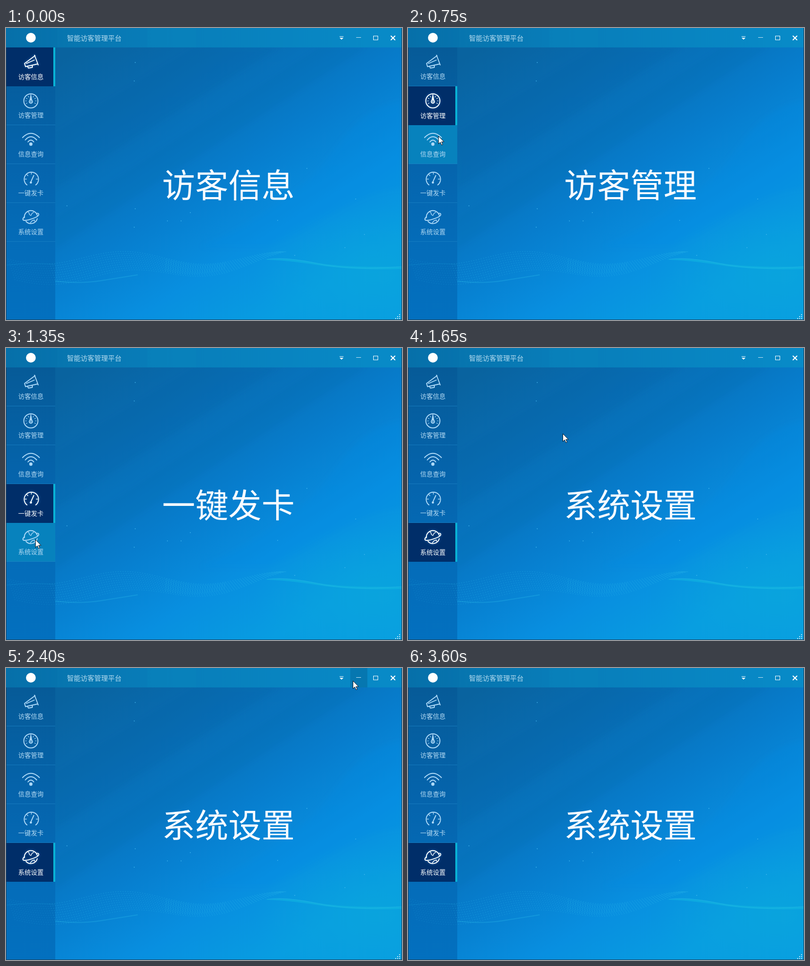
Write an HTML page that moves like this. It is 812 px wide and 601 px high and loops after 3900 ms.

```html
<!DOCTYPE html>
<html lang="zh-CN">
<head>
<meta charset="utf-8">
<style>
html, body { margin: 0; width: 100%; height: 100%; overflow: hidden; background: #0878c6; }
svg { display: block; width: 812px; height: 601px; }
text { font-family: "Noto Sans CJK SC", "Noto Sans CJK", sans-serif; text-anchor: middle; }
.ico { fill: none; stroke: currentColor; stroke-width: 1.9; stroke-linecap: round; stroke-linejoin: round; }
.solid { fill: currentColor; stroke: none; }
</style>
</head>
<body>
<svg viewBox="0 0 812 601">
  <defs>
    <linearGradient id="sky" gradientUnits="userSpaceOnUse" x1="200" y1="10" x2="560" y2="590">
      <stop offset="0" stop-color="#09639f"/>
      <stop offset=".22" stop-color="#086bb0"/>
      <stop offset=".4" stop-color="#0774be"/>
      <stop offset=".55" stop-color="#077dcd"/>
      <stop offset=".78" stop-color="#088fe0"/>
      <stop offset="1" stop-color="#089de1"/>
    </linearGradient>
    <linearGradient id="side" x1="0" y1="0" x2="0" y2="1">
      <stop offset="0" stop-color="#065b98"/>
      <stop offset=".4" stop-color="#0564ac"/>
      <stop offset=".75" stop-color="#046dba"/>
      <stop offset="1" stop-color="#0370bf"/>
    </linearGradient>
    <linearGradient id="bar" x1="0" y1="0" x2="1" y2="0">
      <stop offset="0" stop-color="#0771a9"/>
      <stop offset=".35" stop-color="#087cb8"/>
      <stop offset="1" stop-color="#088bc8"/>
    </linearGradient>
    <radialGradient id="teal">
      <stop offset="0" stop-color="#0aa6dc" stop-opacity=".7"/>
      <stop offset="1" stop-color="#0aa6dc" stop-opacity="0"/>
    </radialGradient>
    <filter id="soft" x="-20%" y="-20%" width="140%" height="140%"><feGaussianBlur stdDeviation="5"/></filter>
    <filter id="glow" x="-50%" y="-50%" width="200%" height="200%"><feGaussianBlur stdDeviation="2.5"/></filter>
    <clipPath id="main"><rect x="101" y="40" width="710" height="560"/></clipPath>
  </defs>

  <rect width="812" height="601" fill="url(#sky)"/>
  <g clip-path="url(#main)">
    <g filter="url(#soft)">
      <path d="M101 215L385 40H560L101 330Z" fill="#045c9c" opacity=".12"/>
      <path d="M101 390L640 40H740L101 455Z" fill="#045c9c" opacity=".1"/>
      <path d="M400 450C470 420 520 390 600 330S700 170 811 150V330C700 340 640 420 540 450Z" fill="#0a8ae4" opacity=".22"/>
    </g>
    <ellipse cx="760" cy="510" rx="250" ry="150" fill="url(#teal)"/>
  </g>
  <rect y="40" width="101" height="561" fill="url(#side)"/>
  <g id="wave" fill="none" stroke="#2cb8e8"></g>
  <g id="sparks" fill="#49bdf0" opacity=".65"></g>

  <rect width="812" height="40" fill="url(#bar)"/>
  <rect x="1" width="104" height="40" fill="#046da8" opacity=".3"/>
  <rect x="290" width="100" height="40" fill="#0a86bd" opacity=".25"/>
  <rect id="btnHover" width="35" height="40" fill="#0677b0"/>
  <circle cx="51" cy="20" r="10" fill="#fff"/>
  <text x="181" y="26" font-size="14" fill="#b4dbef">智能访客管理平台</text>
  <g fill="none" stroke="#fff">
    <path d="M684 17.5h8"/>
    <path d="M684 20h8l-4 4z" fill="#fff" stroke="none"/>
    <path d="M718 19.5h10" stroke="#c4e4f4"/>
    <rect x="753.5" y="16.5" width="9" height="8"/>
    <path d="M789 16l9 9m0-9l-9 9" stroke-width="2"/>
  </g>

  <g id="menu"></g>
  <text id="page" x="456" y="349" font-size="68" fill="#f8fbff"></text>

  <path id="grip" fill="#b9e4f7"/>
  <g fill="#173f5d">
    <rect y="40" width="1" height="561"/>
    <rect x="811" width="1" height="601"/>
    <rect y="600" width="812" height="1"/>
  </g>
  <path id="cursor" d="M.5.5V16.5L4.2 13 6.8 18.8 9.2 17.8 6.7 12.2H11.8Z" fill="#fff" stroke="#071522"/>
</svg>
<script>
const $ = id => document.getElementById(id);
const labels = ["访客信息", "访客管理", "信息查询", "一键发卡", "系统设置"];

// Short radial marks from radius a to b at each angle in degrees.
const ticks = (cx, cy, a, b, angles) => angles.map(d => {
  const r = d * Math.PI / 180, c = Math.cos(r), s = Math.sin(r);
  return `M${cx + a * c} ${cy + a * s}L${cx + b * c} ${cy + b * s}`;
}).join("");

// Icons use coordinates local to an 80 px menu row.
const icons = [
  `<path d="M59.5 17L38 33l2 6.5L65 34M58.5 16l7.5 20M44 39l2 3.5 8-1.5v-4M42 33l16-7"/>`,
  `<circle cx="51" cy="30" r="14.5"/><circle cx="51" cy="31.5" r="3.3"/>
   <path class="solid" d="M51 14l2.6 14h-5.2z"/><circle class="solid" cx="51" cy="31.5" r="1.3"/>
   <path stroke-width="1.2" d="${ticks(51, 30, 9, 11, [150, 180, 210, 240, 300, 330, 0, 30])}"/>`,
  `<path d="M34 25.5Q51 8 68.5 25.5M39.5 30.5Q51 17 63 30.5M45 34.5Q51 27 57 34.5"/>
   <circle class="solid" cx="51" cy="39" r="3.4"/>`,
  `<path d="M43 43A14.7 14.7 0 1 1 61 43M57 23.5L51.5 35.5"/>
   <path stroke-width="1.4" d="${ticks(52, 31, 10, 13, [180, 225, 270, 0])}"/>
   <circle class="solid" cx="51" cy="38" r="2.3"/>`,
  `<path d="M37.6 30.5A13.5 13.5 0 0 1 64 25.5M64.1 32.5A13.5 13.5 0 0 1 41 38"/>
   <path d="M38 28.500C33 32 34 36 38 36C46 36 64 30 67 25C68 22 66 21 63.500 21.500"/>
   <path stroke-width="1.4" d="M44 18l3 2 1 4 3 2 2-4 4-3M50 41l3-4 5-2 1 3"/>`
];

$("menu").innerHTML = labels.map((name, i) => `
  <g transform="translate(0 ${40 + 80 * i})">
    <rect class="hot" x="1" width="100" height="80" fill="#0782bd"/>
    <path d="M1 79.5h100" stroke="#1f86c8" opacity=".65"/>
    <g class="on"><rect x="1" width="96" height="80" fill="#002e69"/>
      <rect x="97" width="4" height="80" fill="#08b3d6"/>
      <g class="ico" color="#238bdc" opacity=".65" filter="url(#glow)">${icons[i]}</g></g>
    <g class="ico">${icons[i]}</g>
    <text x="51" font-size="13">${name}</text>
  </g>`).join("");

const rows = [...$("menu").children].map(g => ({
  g,
  on: g.querySelector(".on"),
  hot: g.querySelector(".hot"),
  text: g.querySelector("text")
}));

function buildWave() {
  const top = x => 473 - 13 * Math.cos((x - 240) / 330 * 2 * Math.PI);
  const depth = x => 42 * Math.max(0, 1 - (Math.max(0, x - 101) / 460) ** 2);
  let side = "", dots = "", bars = "";
  for (let x = 4; x < 560; x += 5) {
    for (let k = 0; k < 10; k++) {
      const y = top(x) + depth(x) * k / 9;
      const dot = `M${x + k * 1.5} ${y.toFixed(1)}h1.8`;
      if (x < 88) side += dot; else dots += dot;
    }
    if (x > 325 && x < 450) bars += `M${x} ${top(x).toFixed(1)}l-2 ${(depth(x) * .85).toFixed(1)}`;
  }
  $("wave").innerHTML = `
    <path d="${side}" opacity=".2"/>
    <path d="${dots}" opacity=".42"/>
    <path d="${bars}" opacity=".25"/>
    <path d="M101 521Q150 527 195 520T270 508" opacity=".3" stroke-width="2"/>
    <path d="M1 488Q60 482 101 487" opacity=".2"/>
    <path d="M530 477Q570 470 630 482T811 491V496Q710 499 640 488T530 477Z" fill="#14bce0" stroke="none" opacity=".45"/>
    <path d="M535 476Q570 470 640 485T811 491" opacity=".5"/>`;
}

function buildSparks() {
  const spots = [265, 372, 263, 410, 331, 397, 359, 397, 378, 380, 125, 366, 617, 289,
    592, 468, 557, 396, 717, 352, 265, 71, 735, 425, 695, 452, 263, 109];
  let out = "";
  for (let i = 0; i < spots.length; i += 2)
    out += `<circle cx="${spots[i]}" cy="${spots[i + 1]}" r="1.1"/>`;
  $("sparks").innerHTML = out;
}

let grip = "";
for (let r = 0; r < 3; r++)
  for (let c = 0; c <= r; c++) grip += `M${806 - 4 * c} ${589 + 4 * r}h2v2h-2z`;
$("grip").setAttribute("d", grip);
buildWave();
buildSparks();

const LOOP = 3900, STEP = 150;
// Pointer keys: time, x, y; positions are sampled once per STEP.
const path = [[150, 150, 132], [300, 88, 147], [450, 74, 143], [600, 67, 164], [750, 62, 222],
  [900, 58, 262], [1050, 57, 332], [1200, 57, 334], [1350, 60, 394], [1500, 82, 388],
  [1650, 317, 176], [1950, 570, 80], [2100, 681, 25], [2250, 691, 24], [2400, 711, 26],
  [2550, 746, 26], [2850, 748, 25], [3150, 714, 76], [3300, 730, 132], [3450, 782, 228]];
// Menu page by the time it becomes active.
const pages = [[0, 0], [600, 1], [900, 2], [1200, 3], [1500, 4]];

function pointer(t) {
  if (t < path[0][0] || t >= 3600) return null;
  const i = path.findIndex(k => k[0] > t);
  if (i < 0) return path[path.length - 1].slice(1);
  const [t0, x0, y0] = path[i - 1], [t1, x1, y1] = path[i];
  const f = (t - t0) / (t1 - t0);
  return [Math.round(x0 + (x1 - x0) * f), Math.round(y0 + (y1 - y0) * f)];
}

const show = (el, yes) => el.setAttribute("visibility", yes ? "visible" : "hidden");

function draw(time) {
  let t = Math.floor((time % LOOP) / STEP) * STEP;
  if (t === 3000) t = 2850; // the pointer rests for two steps
  const p = pointer(t);
  const active = pages.filter(k => k[0] <= t).pop()[1];
  const hover = p && p[0] < 101 && p[1] >= 40 ? Math.floor((p[1] - 40) / 80) : -1;
  const button = p && p[1] < 40 && p[0] >= 671 ? Math.floor((p[0] - 671) / 35) : -1;

  rows.forEach((r, i) => {
    const on = i === active;
    show(r.on, on);
    show(r.hot, i === hover && !on);
    r.g.setAttribute("color", on ? "#fff" : "#acd8f7");
    r.text.setAttribute("fill", on ? "#fff" : "#b4daf3");
    r.text.setAttribute("y", on ? 65 : 64);
  });
  $("page").textContent = labels[active];
  show($("btnHover"), button >= 0);
  $("btnHover").setAttribute("x", 671 + 35 * Math.max(0, button));
  show($("cursor"), p);
  if (p) $("cursor").setAttribute("transform", `translate(${p[0]} ${p[1]})`);
}

const start = performance.now();
function tick() {
  draw(performance.now() - start);
  requestAnimationFrame(tick);
}
tick();
</script>
</body>
</html>
```
